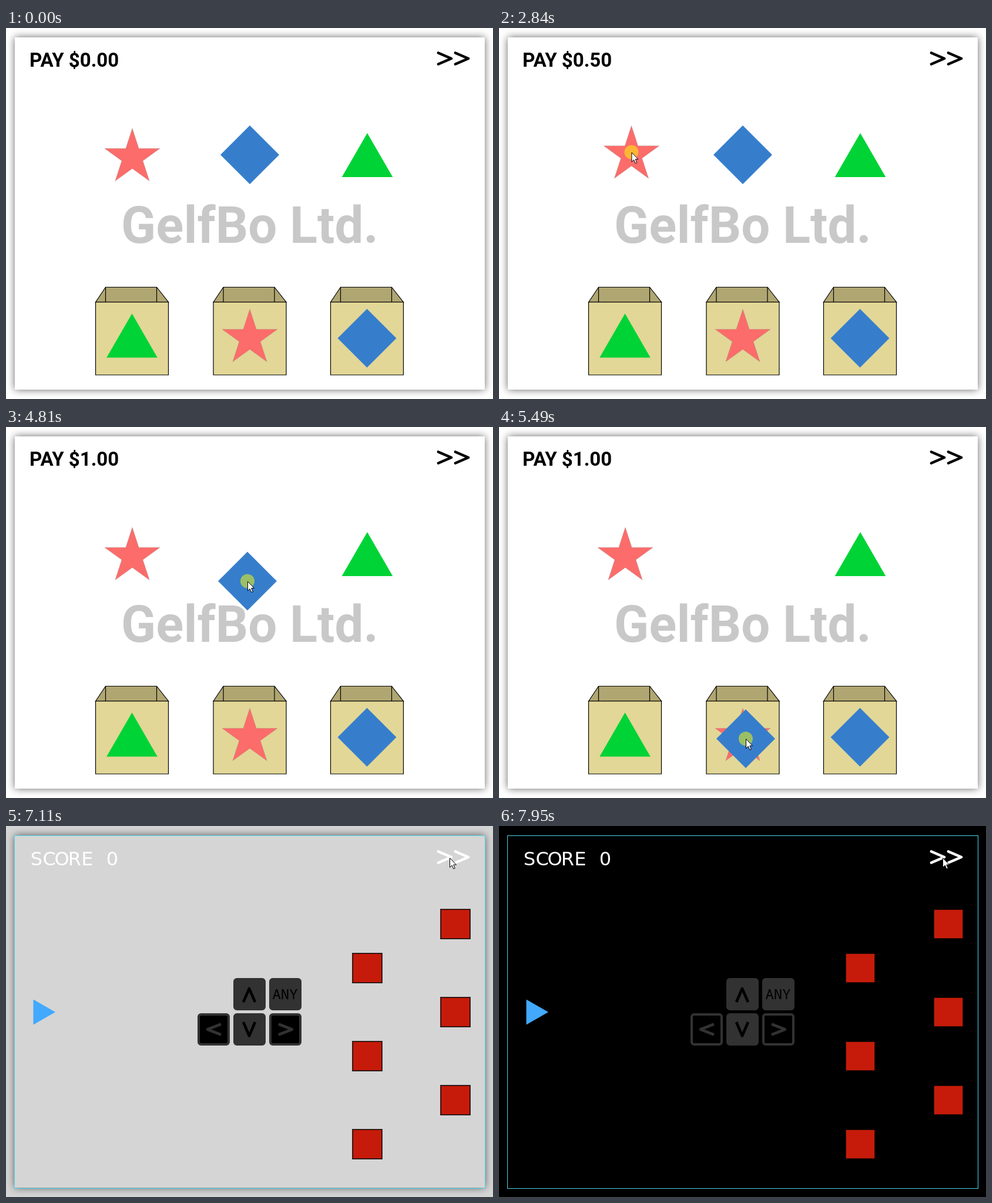
An HTML page that plays this animation: 829 by 632 pixels, repeating every 8000 ms.

```html
<!DOCTYPE html>
<html lang="en">
<head>
<meta charset="utf-8">
<title>Sorting game</title>
<style>
  html, body { margin: 0; height: 100%; overflow: hidden; background: #fff; }
  svg { display: block; width: 829px; height: 632px; }
  .panel { filter: drop-shadow(0 0 7px rgba(0, 0, 0, .6)); }
  .condensed { font-family: Roboto, "Open Sans", sans-serif; font-weight: 700; font-stretch: 75%; }
  .chevron { fill: none; stroke-width: 4.6; stroke-linejoin: round; }
  .star { fill: #fc6c6a; stroke: #8888; stroke-width: .6; }
  .diamond { fill: #367ecc; }
  .triangle { fill: #00d335; }
</style>
</head>
<body>
<svg viewBox="0 0 829 632">
  <defs>
    <path id="star" class="star"/>
    <path id="diamond" class="diamond" d="M0-50 50 0 0 50-50 0z"/>
    <path id="triangle" class="triangle" d="M0-37 43.3 38H-43.3z"/>
    <g id="box" stroke="#000" stroke-width="1.2">
      <path fill="#b0a672" d="M0 0 17-25.5H104L124 0zM17-25.5V0M104-25.5V0"/>
      <path fill="#e2d797" d="M0 0H124V124H0z"/>
    </g>
    <path id="chevrons" class="chevron" d="M736 42.5 758 52 736 61.5M765 42.5 787 52 765 61.5" stroke-linecap="round"/>
    <rect id="block" width="50" height="50" fill="#c61b0a" stroke="#000" stroke-opacity=".75" stroke-width="2"/>
    <rect id="key" width="51" height="51" rx="4" stroke="#323232" stroke-width="4"/>
  </defs>

  <rect id="panel" class="panel" x="15" y="16" width="800" height="600"/>

  <g id="sorting">
    <text id="pay" class="condensed" x="40" y="66" font-size="33"></text>
    <use href="#chevrons" stroke="#000"/>
    <text class="condensed" x="415" y="366" font-size="87" fill="#c8c8c8" text-anchor="middle">GelfBo Ltd.</text>
    <use href="#box" x="152.5" y="467"/>
    <use href="#box" x="353" y="467"/>
    <use href="#box" x="552.5" y="467"/>
    <use href="#triangle" x="214.5" y="523.5"/>
    <use href="#star" x="415" y="524"/>
    <use href="#diamond" x="614.5" y="528.5"/>
    <use href="#triangle" x="615" y="216"/>
    <use id="dragDiamond" href="#diamond"/>
    <use id="dragStar" href="#star"/>
  </g>

  <g id="shooter">
    <rect x="14.5" y="16.5" width="801" height="601" fill="none" stroke="#4bd8ea"/>
    <text x="52 73.6 95.2 116.8 138.4 160 181" y="67" font-family="DejaVu Sans, sans-serif" font-size="32" fill="#fff" text-anchor="middle">SCORE 0</text>
    <use href="#chevrons" y="1" stroke="#fff"/>
    <path fill="#42a9fd" d="M46.5 295.5 84 317 46.5 338.5z"/>
    <g id="blocks"></g>
    <use href="#key" x="389" y="261" fill="#323232"/>
    <use href="#key" x="450" y="261" fill="#323232"/>
    <use href="#key" x="328" y="321"/>
    <use href="#key" x="389" y="321" fill="#323232"/>
    <use href="#key" x="450" y="321"/>
    <path class="chevron" stroke="#000" d="M404 300 414 277 424 300M404 334 414 357.500 424 334"/>
    <path class="chevron" stroke="#323232" d="M366 337.500 343 346.500 366 355.500M464 337.500 487 346.500 464 355.500"/>
    <text x="475" y="295" font-family="Noto Sans Mono, monospace" font-size="24" text-anchor="middle">ANY</text>
  </g>

  <g id="cursor">
    <circle id="press" r="12" fill="#ff0" fill-opacity=".5"/>
    <path fill="#fff" stroke="#000" stroke-linejoin="round" d="M.5.5V16.500L4.200 13 6.800 19 9.300 18 6.800 12H11.500z"/>
  </g>
</svg>
<script>
const LOOP = 8000, SWITCH = 6900;
const $ = id => document.getElementById(id);
const place = (el, x, y) => el.setAttribute('transform', `translate(${x} ${y})`);
const show = (el, on) => el.setAttribute('display', on ? 'inline' : 'none');
const clamp = u => Math.min(1, Math.max(0, u));
const ease = u => u * u * (3 - 2 * u);

// cursor waypoints: time, x, y
const PATH = [
  [60, 698, 622], [540, 204, 207], [830, 204, 207], [1555, 418, 498.5],
  [1670, 418, 498.5], [1820, 456, 529], [2640, 223, 208], [2800, 223, 208],
  [3460, 442.5, 531], [3770, 442.5, 531], [4410, 409, 204], [4560, 409, 204],
  [5490, 420, 531], [5910, 420, 531], [6450, 753, 49], [6590, 755, 54]
];
const DRAGS = [
  { from: 860, to: 1680, shape: 'star' },
  { from: 2840, to: 3770, shape: 'star' },
  { from: 4610, to: 5760, shape: 'diamond' }
];

const starPoints = Array.from({ length: 10 }, (_, i) => {
  const r = i % 2 ? 18.9 : 49.5, a = i * Math.PI / 5;
  return [r * Math.sin(a), 4.5 - r * Math.cos(a)].map(v => v.toFixed(2));
});
$('star').setAttribute('d', `M${starPoints.join(' ')}z`);

$('blocks').innerHTML = Array.from({ length: 6 }, (_, i) =>
  `<use href="#block" x="${i % 2 ? 590 : 740}" y="${142 + 75 * i}"/>`).join('');

function cursorAt(t) {
  const i = PATH.findIndex(p => p[0] > t);
  if (i < 0) return PATH.at(-1).slice(1);
  const [t1, x1, y1] = PATH[i], [t0, x0, y0] = PATH[Math.max(0, i - 1)];
  const k = i ? ease((t - t0) / (t1 - t0)) : 1;
  return [x0 + (x1 - x0) * k, y0 + (y1 - y0) * k];
}

function draw(t) {
  const [x, y] = cursorAt(t);
  const drag = DRAGS.find(d => t >= d.from && t < d.to);
  const pay = t < 1680 ? 0 : t < 3770 ? .5 : t < 5760 ? 1 : .5;

  show($('cursor'), t >= 70);
  place($('cursor'), x, y);
  show($('press'), drag);
  place($('dragStar'), ...(drag?.shape === 'star' ? [x, y] : [215, 216]));
  place($('dragDiamond'), ...(drag?.shape === 'diamond' ? [x, y] : [415, 216]));
  $('pay').textContent = `PAY $${pay.toFixed(2)}`;

  show($('sorting'), t < SWITCH);
  show($('shooter'), t >= SWITCH);
  const grey = Math.round(255 * (1 - ease(clamp((t - SWITCH - 20) / 740))));
  const colour = `rgb(${grey},${grey},${grey})`;
  document.body.style.background = colour;
  $('panel').setAttribute('fill', colour);
}

function tick() {
  draw(performance.now() % LOOP);
  requestAnimationFrame(tick);
}
tick();
</script>
</body>
</html>
```
